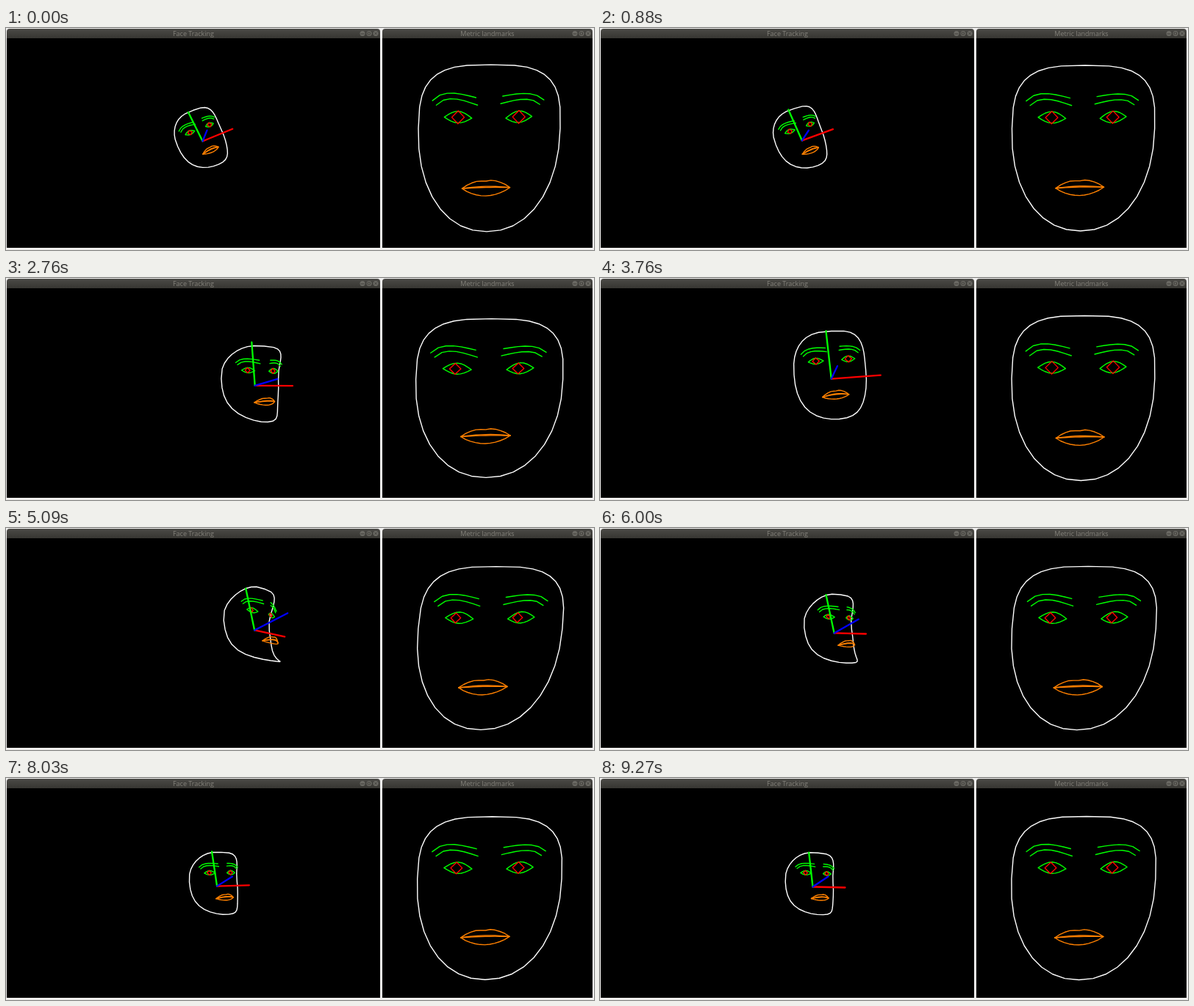
An HTML page with a canvas that plays this animation: 800 px wide and 303 px high, repeating every 9.3 s.

```html
<!DOCTYPE html>
<html lang="en">
<head>
<meta charset="utf-8">
<title>Face Tracking</title>
<style>
html, body { margin: 0; width: 100%; height: 100%; overflow: hidden; background: #f0efee; }
canvas { display: block; width: 800px; height: 303px; }
</style>
</head>
<body>
<canvas id="stage" width="800" height="303"></canvas>
<script>
const ctx = document.getElementById('stage').getContext('2d');
const { sin, cos, abs, sign, PI } = Math;
const LOOP = 9300, STEP = 30;
const UNIT = 13, ORIGIN_X = 654, ORIGIN_Y = 161;   // metric panel
const DISTANCE = 75, AXIS = 10;                    // in face units
const MID_X = 656.5, MID_Y = 163.5;                // centre of the face outline
const WHITE = '#fff', GREEN = '#0f0', RED = '#f00', ORANGE = '#ff8000', BLUE = '#00f';

// time, x, y, axis length, yaw, pitch, roll in degrees
const HEAD = [
  [0, 267, 154, 45.5, 8, 19, 23],
  [950, 275, 153, 47, 12, 17, 20],
  [1700, 329, 151, 58, 41, 4, -4],
  [2300, 340, 150, 58, 44, 5, -4],
  [2800, 338, 146, 60, 30, 9, 0],
  [3760, 314, 137, 68, 7, 15, 4.4],
  [5090, 338, 139, 62, 52, 22, -9],
  [5640, 333, 140, 59, 49, 21, -7],
  [6850, 283, 150, 47.7, 16.5, 17, 12.7],
  [7550, 277, 150, 48, 18, 17, 11],
  [8030, 287, 147, 49, 26.5, 15.5, 1.2],
  [9270, 289, 148, 49, 26.5, 16.6, -1.2]
];

const lerp = (a, b, t) => a + (b - a) * t;
const range = n => Array.from({ length: n + 1 }, (_, i) => i / n);
const spread = (v, power) => sign(v) * abs(v) ** power;
const hump = t => abs(sin(PI * t));

function headAt(time) {
  let i = 0;
  while (i < HEAD.length - 2 && time >= HEAD[i + 1][0]) i++;
  const a = HEAD[i], b = HEAD[i + 1];
  const t = Math.min(1, (time - a[0]) / (b[0] - a[0]));
  const [, x, y, size, yaw, pitch, roll] = a.map((v, k) => lerp(v, b[k], t));
  return { x, y, size, yaw, pitch, roll };
}

// Superellipse outline: squarer above the cheeks, rounder below, deepest at the ears
function outline() {
  return range(36).slice(0, -1).map(t => {
    const s = sin(2 * PI * t), c = cos(2 * PI * t), upper = c > 0;
    const power = 2 / (upper ? 3.2 : 2.15);
    const v = spread(c, power);
    return [
      MID_X + 98 * spread(s, power),
      137 - v * (upper ? 85 : 138),
      -1.8 + 6.2 * abs(v) ** (upper ? 2.4 : 3.5)
    ];
  });
}

// Corner pairs run from the outer to the inner end
function brow([x0, y0, x1, y1], lift) {
  return range(6).map(t => [
    lerp(x0, x1, t), lerp(y0, y1, t) - lift * hump(t ** .7), lerp(2.5, 4.5, t)
  ]);
}

function eye([x0, y0, x1, y1]) {
  const lid = (t, h) => [lerp(x0, x1, t), lerp(y0, y1, t) + h * hump(t), lerp(2.6, 3.1, t)];
  return [...range(8).map(t => lid(t, -8.5)), ...range(8).map(t => lid(1 - t, 7))];
}

function iris([x0, y0, x1, y1], yaw) {
  const x = (x0 + x1) / 2 - .11 * (yaw - 8), y = (y0 + y1) / 2 - .5;
  const r = 9 - .045 * yaw;
  return range(4).slice(0, -1).map(t => [x + r * cos(2 * PI * t), y + r * sin(2 * PI * t), 2.9]);
}

function lip(height) {
  return range(10).map(t => [
    lerp(621, 687, t), lerp(217.5, 216, t) + height(t), 4.8 - (2 * t - 1) ** 2
  ]);
}

function facePaths(yaw) {
  const upperLip = t => -11 * hump(t) ** .8 + 2 * Math.exp(-(((t - .47) / .1) ** 2));
  const lowerLip = t => 10.5 * hump(t) ** .8;
  const paths = [[outline(), WHITE, true]];
  const sides = [
    { dir: 1, brow: [577, 100, 637, 96], eye: [594, 122, 632, 123.5], lift: 8.5 },
    { dir: -1, brow: [731, 99, 674, 94], eye: [715, 121, 679, 123.5], lift: 6.5 }
  ];
  for (const side of sides) {
    const [x0, y0, x1, y1] = side.brow;
    paths.push(
      [brow(side.brow, side.lift), GREEN, false],
      [brow([x0 + 5.5 * side.dir, y0 + 6, x1 + 2.5 * side.dir, y1 + 10], side.lift), GREEN, false],
      [eye(side.eye), GREEN, true],
      [iris(side.eye, yaw), RED, true]
    );
  }
  paths.push(
    [[...lip(upperLip), ...lip(lowerLip).reverse()], ORANGE, true],
    [lip(t => -2.2 * hump(t)), ORANGE, false],
    [lip(t => -.8 * hump(t)), ORANGE, false]
  );
  return paths;
}

// The estimated face stretches and leans a little as the head turns
function warper({ yaw, pitch }) {
  const stretch = .35 * (pitch - 15) - .08 * (yaw - 20);
  const wide = 1 - stretch / 150, tall = 1 + stretch / 110;
  const lean = -.015 - .00007 * yaw * pitch;
  return ([x, y, z]) => [
    MID_X + (x - MID_X) * wide + lean * (y - 157),
    MID_Y + (y - MID_Y) * tall,
    z
  ];
}

// Roll, then pitch, then yaw; x right, y up, z towards the viewer
function rotator({ yaw, pitch, roll }) {
  const [a, b, c] = [yaw, pitch, roll].map(v => v * PI / 180);
  return ([x, y, z]) => {
    [x, y] = [x * cos(c) - y * sin(c), x * sin(c) + y * cos(c)];
    [y, z] = [y * cos(b) + z * sin(b), z * cos(b) - y * sin(b)];
    return [x * cos(a) + z * sin(a), y, z * cos(a) - x * sin(a)];
  };
}

function stroke(points, color, closed, width) {
  ctx.beginPath();
  for (const [x, y] of points) ctx.lineTo(x + .5, y + .5);
  if (closed) ctx.closePath();
  ctx.strokeStyle = color;
  ctx.lineWidth = width;
  ctx.stroke();
}

function drawWindow(x, right, title) {
  const bar = ctx.createLinearGradient(0, 1, 0, 15);
  bar.addColorStop(0, '#4b4a46');
  bar.addColorStop(1, '#353430');
  ctx.fillStyle = bar;
  ctx.beginPath();
  ctx.roundRect(x, 1, right - x, 14, [4, 4, 0, 0]);
  ctx.fill();
  ctx.fillStyle = '#000';
  ctx.fillRect(x, 14, right - x, 286);

  ctx.fillStyle = '#85837c';
  ctx.font = '9px "Open Sans", "Noto Sans", sans-serif';
  ctx.textAlign = 'center';
  ctx.fillText(title, (x + right) / 2, 11);

  ctx.lineWidth = 1;
  for (let i = 0; i < 3; i++) {
    const bx = right - 24 + i * 9;
    ctx.fillStyle = '#6b6a64';
    ctx.beginPath();
    ctx.arc(bx, 7.5, 3.5, 0, 2 * PI);
    ctx.fill();
    ctx.strokeStyle = '#403f3b';
    ctx.beginPath();
    if (i === 0) {
      ctx.moveTo(bx - 2, 8); ctx.lineTo(bx + 2, 8);
    } else if (i === 1) {
      ctx.rect(bx - 1.5, 6, 3, 3);
    } else {
      ctx.moveTo(bx - 1.5, 6); ctx.lineTo(bx + 1.5, 9);
      ctx.moveTo(bx + 1.5, 6); ctx.lineTo(bx - 1.5, 9);
    }
    ctx.stroke();
  }
}

function draw(time) {
  const head = headAt(Math.floor(time % LOOP / STEP) * STEP);
  const warp = warper(head), rotate = rotator(head);
  const scale = head.size / AXIS;
  const place = ([x, y], zoom) => [head.x + x * scale * zoom, head.y - y * scale * zoom];
  const project = ([px, py, z]) => {
    const p = rotate([(px - ORIGIN_X) / UNIT, (ORIGIN_Y - py) / UNIT, z]);
    return place(p, 1 / (1 - p[2] / DISTANCE));
  };

  ctx.fillStyle = '#f0efee';
  ctx.fillRect(0, 0, 800, 303);
  drawWindow(1, 509, 'Face Tracking');
  drawWindow(512, 798, 'Metric landmarks');

  ctx.lineJoin = ctx.lineCap = 'round';
  for (const [points, color, closed] of facePaths(head.yaw)) {
    const metric = points.map(warp);
    stroke(metric.map(project), color, closed, 1.4);
    stroke(metric, color, closed, 1.4);
  }
  const axes = [[[AXIS, 0, 0], RED], [[0, AXIS, 0], GREEN], [[0, 0, AXIS], BLUE]];
  for (const [tip, color] of axes) {
    stroke([[head.x, head.y], place(rotate(tip), 1)], color, false, 2.3);
  }
}

const start = performance.now();
function tick() {
  draw(performance.now() - start);
  requestAnimationFrame(tick);
}
tick();
</script>
</body>
</html>
```
